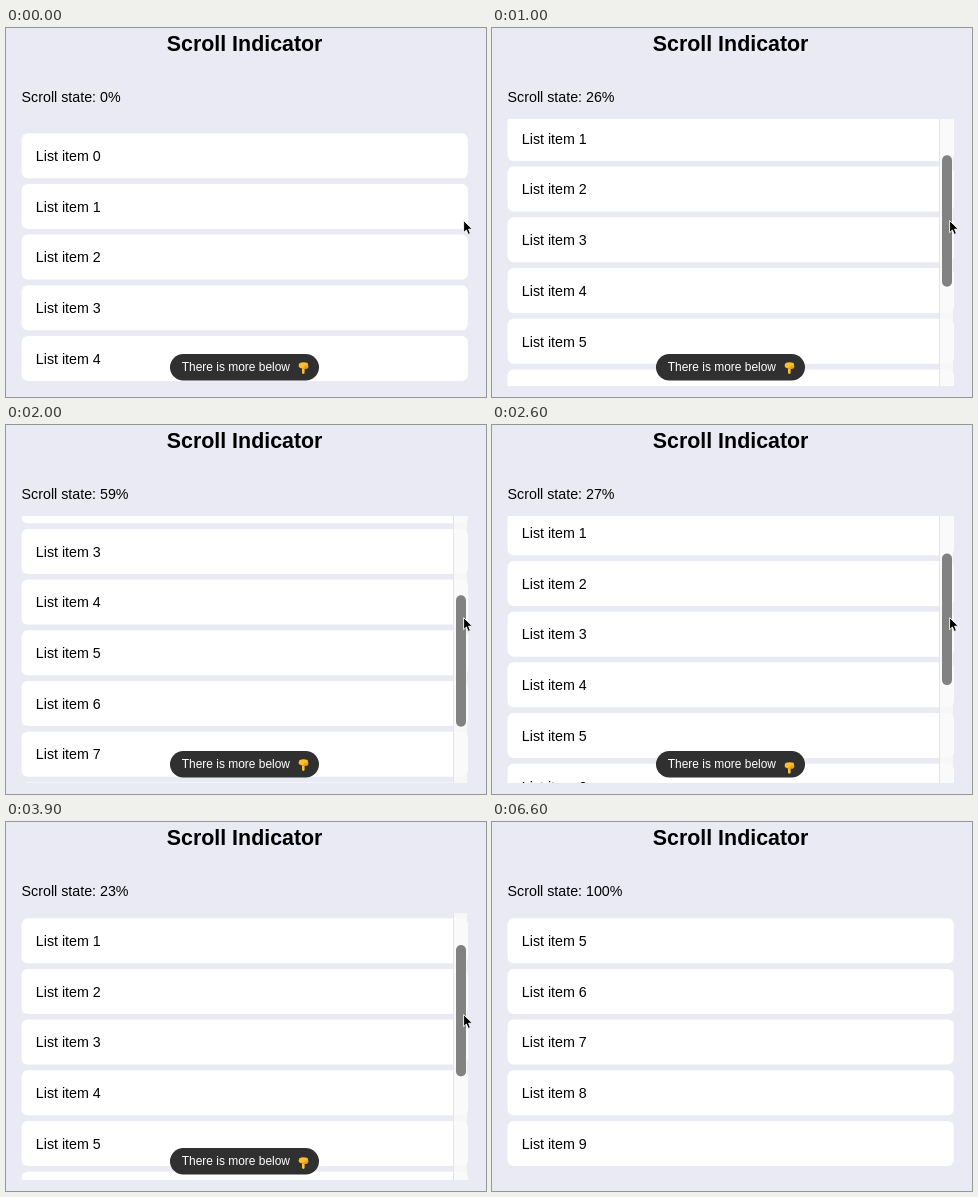
Recreate the animation shown at these times as an HTML page. Size 480x369 px, loop 6930 ms.

```html
<!DOCTYPE html>
<html lang="en">
<head>
<meta charset="utf-8">
<title>Scroll Indicator</title>
<style>
  html, body { margin: 0; width: 100%; height: 100%; overflow: hidden; background: #eaeaf4; }
  svg { display: block; font: 14.25px "Liberation Sans", Helvetica, Arial, sans-serif; }
</style>
</head>
<body>
<svg width="480" height="369" viewBox="0 0 480 369">
  <defs><clipPath id="view"><rect x="15" y="91" width="447" height="267"/></clipPath></defs>
  <text x="238.6" y="23.3" text-anchor="middle" font-size="21.4" font-weight="bold">Scroll Indicator</text>
  <text id="state" x="15.6" y="74"></text>
  <g clip-path="url(#view)"><g id="list"></g></g>
  <g id="bar">
    <rect x="447" y="91" width="14" height="267" fill="#fafafa" fill-opacity=".85"/>
    <rect x="447" y="91" width="1" height="267" fill="#e4e4e6"/>
    <rect id="thumb" x="450" width="10" height="131.5" rx="5" fill="#828282"/>
  </g>
  <g id="pill">
    <rect x="164" y="326" width="149" height="26.5" rx="13.25" fill="#303030"/>
    <text x="175.8" y="343.3" font-size="11.95" fill="#fff">There is more below</text>
    <g id="hand">
      <path d="M293.4 335.2Q297 333.6 301.6 335L302.4 338.5Q302.4 340.8 298.6 341V345Q297.4 347 296 345V340.6Q292.6 340 292.6 337.6Z" fill="#fcc02e"/>
      <path d="M296 340.2H301.6M299.2 337.6V340M301 337.2V340" fill="none" stroke="#d98512" stroke-width=".8"/>
    </g>
  </g>
  <path id="cursor" d="M457.6 192.6V204.6L460.4 202L462.2 206.4L464.4 205.5L462.6 201.2H466.4Z" fill="#000" stroke="#fff" stroke-width=".9"/>
</svg>
<script>
const LOOP = 6930, MAX = 262.5, PITCH = 50.7;
// [time in ms, scroll offset in px]
const path = [[0, 0], [1000, 68], [2000, 153.4], [3000, 27], [3900, 59.7], [4200, MAX]];
const el = id => document.getElementById(id);
const clamp = v => Math.max(0, Math.min(1, v));
const show = (id, on) => el(id).setAttribute("opacity", +on);
const shift = (id, y) => el(id).setAttribute("transform", `translate(0 ${y})`);

el("list").innerHTML = Array.from({ length: 10 }, (_, i) => {
  const y = 105.2 + i * PITCH;
  return `<rect x="15.6" y="${y}" width="446.2" height="45" rx="6" fill="#fff"/>
    <text x="29.8" y="${y + 27.8}">List item ${i}</text>`;
}).join("");

function scrollAt(t) {
  const i = path.findIndex(p => p[0] > t);
  if (i < 0) return MAX;
  const [t0, a] = path[i - 1], [t1, b] = path[i];
  const k = (t - t0) / (t1 - t0);
  // steady on the first way down, eased around each turn
  const eased = i === 1 ? k : i === 2 ? Math.sin(k * Math.PI / 2) : (1 - Math.cos(k * Math.PI)) / 2;
  return a + (b - a) * eased;
}

function draw(now) {
  const t = Math.floor(now % LOOP / 100) * 100;
  const s = scrollAt(t);
  shift("list", -s);
  el("state").textContent = `Scroll state: ${Math.ceil(s / MAX * 100)}%`;
  el("thumb").setAttribute("y", 93 + s / MAX * 132.3);
  show("bar", t < 100 ? 0 : 1 - clamp((t - 5400) / 500));
  show("pill", s < MAX);
  shift("hand", 3 * Math.abs(Math.sin(t / 1000 * Math.PI)));
  show("cursor", t < 5100);
  requestAnimationFrame(() => draw(performance.now() - start));
}
const start = performance.now();
draw(0);
</script>
</body>
</html>
```
